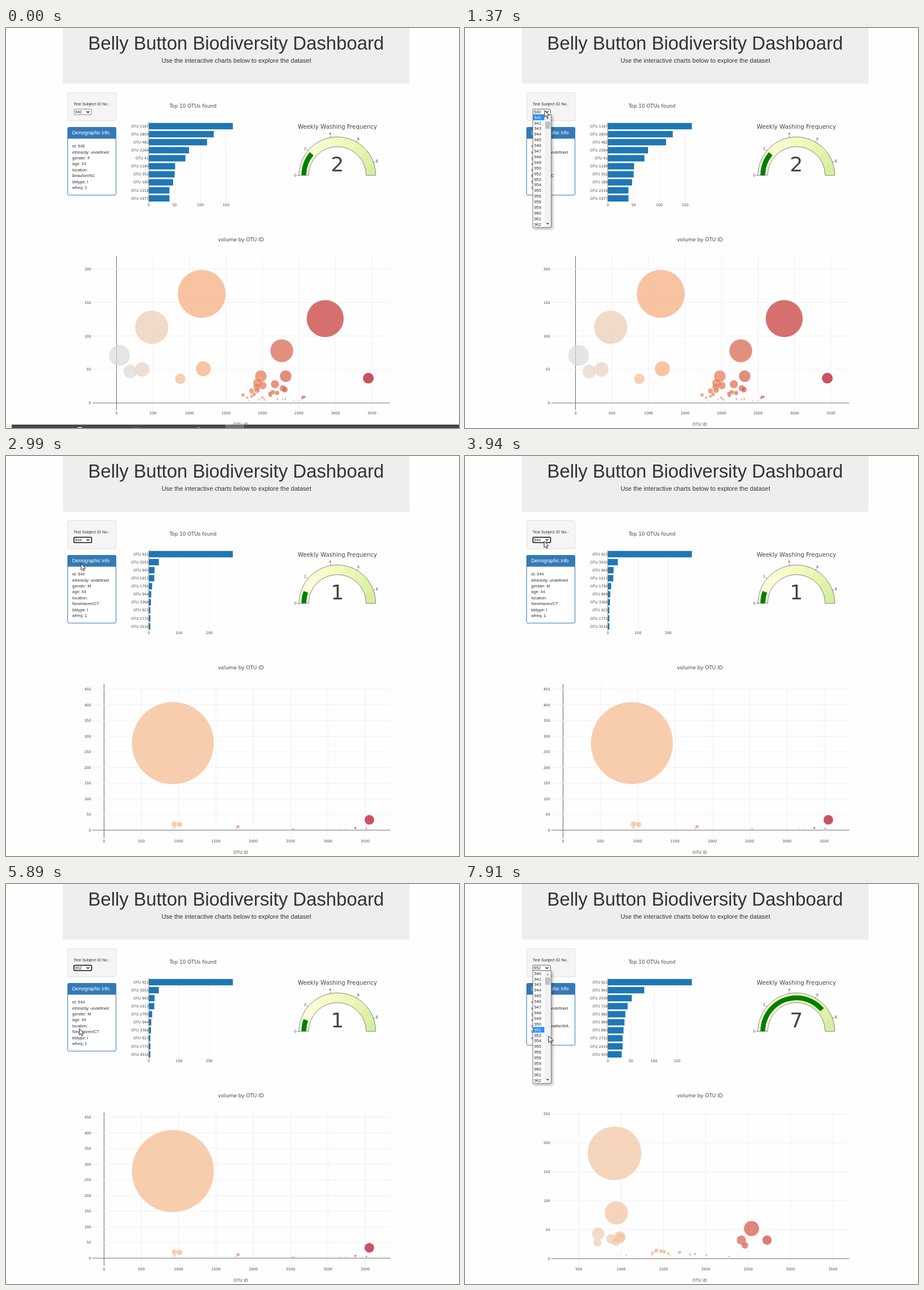
These frames come from a looping animation (797x703 px, 8 s). An HTML page with a canvas:

```html
<!DOCTYPE html>
<html lang="en">
<head>
<meta charset="utf-8">
<title>Belly Button Biodiversity Dashboard</title>
<style>
html, body { margin: 0; width: 100%; height: 100%; overflow: hidden; background: #fefefe; }
canvas { display: block; }
</style>
</head>
<body>
<canvas id="stage" width="797" height="703"></canvas>
<script>
const ctx = document.getElementById('stage').getContext('2d');
const LOOP = 8000;
const SANS = '"Liberation Sans", Arial, sans-serif';
const PLOT = '"DejaVu Sans", Verdana, sans-serif';

// "main" maps OTU ids to counts, largest first; "tail" describes the scatter of small ones.
const subjects = [
  {
    id: 940, freq: 2, x0: 194.5, xStep: 64.2, y0: 659, yStep: 58.85, barTick: 50, minId: 41,
    info: ['gender: F', 'age: 24', 'location:', 'Beaufort/NC', 'bbtype: I', 'wfreq: 2'],
    main: '1167:163 2859:126 482:113 2264:78 41:71 1189:51 352:50 189:47 2318:40 1977:40 3450:37 874:36',
    tail: { size: 36, first: 30, decay: 13, centre: 2110, spread: 1800 }
  },
  {
    id: 944, freq: 1, x0: 172.5, xStep: 65.65, y0: 657.5, yStep: 27.5, barTick: 100, minId: 41,
    info: ['gender: M', 'age: 44', 'location:', 'NewHaven/CT', 'bbtype: I', 'wfreq: 1'],
    main: '922:278 3555:33 943:19 1013:18 1795:11 944:8 3368:7 923:5 1770:5 3516:5',
    tail: { size: 7, first: 4, decay: 9, centre: 2700, spread: 1600 }
  },
  {
    id: 952, freq: 7, x0: 125.8, xStep: 74.5, y0: 658.5, yStep: 50.9, barTick: 50, minId: 350,
    info: ['gender: F', 'age: 48', 'location: Seattle/WA', 'bbtype: I', 'wfreq: 7'],
    main: '922:182 943:79 2539:52 728:43 982:38 989:36 883:34 2722:32 2419:32 939:30 719:28 2461:23',
    tail: { size: 20, first: 14, decay: 11, centre: 1600, spread: 1900 }
  }
];
const MAX_ID = 3450;

function random(seed) {
  return () => (seed = (seed * 16807) % 2147483647) / 2147483647;
}

for (const s of subjects) {
  const next = random(s.id), { size, first, decay, centre, spread } = s.tail;
  s.points = s.main.split(' ').map(pair => pair.split(':').map(Number));
  for (let i = 0; i < size; i++) {
    const reach = spread * (0.2 + i / size);
    s.points.push([centre + (next() - 0.5) * reach, Math.round(first * Math.exp(-i / decay))]);
  }
}

// Subject numbers run from 940 to 962 with three gaps.
const options = Array.from({ length: 23 }, (_, i) => 940 + i).filter(id => ![942, 951, 957].includes(id));
const ROW = 9.895, MENU_TOP = 152;

// Pointer moves: start time, end time, destination
const HOME = [140, 145];
const moves = [
  [280, 730, [154, 162]],
  [730, 1130, HOME],
  [1920, 2290, [138, 171]],
  [2400, 2600, [132, 189]],
  [3230, 4120, HOME],
  [4600, 4820, [149, 205]],
  [4820, 5200, [129, 254]],
  [6050, 6770, HOME],
  [7640, 7910, [147, 267]]
];

function pointerAt(t) {
  let [x, y] = [400, 690];
  for (const [from, to, [tx, ty]] of moves) {
    const k = Math.max(0, Math.min(1, (t - from) / (to - from)));
    const eased = k * k * (3 - 2 * k);
    x += (tx - x) * eased;
    y += (ty - y) * eased;
  }
  return [x, y];
}

function text(str, x, y, size, { align = 'left', color = '#333', font = SANS } = {}) {
  ctx.font = `${size}px ${font}`;
  ctx.textAlign = align;
  ctx.fillStyle = color;
  ctx.fillText(str, x, y);
}
const plotText = (str, x, y, size = 6.24, align = 'center') =>
  text(str, x, y, size, { align, color: '#444', font: PLOT });

function rect(x, y, w, h, fill) {
  ctx.fillStyle = fill;
  ctx.fillRect(x, y, w, h);
}

function paint(fill, stroke, width = 1) {
  if (fill) { ctx.fillStyle = fill; ctx.fill(); }
  if (stroke) { ctx.strokeStyle = stroke; ctx.lineWidth = width; ctx.stroke(); }
}

function box(x, y, w, h, r, fill, stroke, width) {
  ctx.beginPath();
  ctx.roundRect(x, y, w, h, r);
  paint(fill, stroke, width);
}

function line(x1, y1, x2, y2, color, width) {
  ctx.beginPath();
  ctx.moveTo(x1, y1);
  ctx.lineTo(x2, y2);
  paint(null, color, width);
}

function triangle(x, y, size, fill) {
  ctx.beginPath();
  ctx.moveTo(x - 2.5, y);
  ctx.lineTo(x + 2.5, y);
  ctx.lineTo(x, y + size);
  paint(fill);
}

function colorScale(stops, v) {
  const i = Math.max(1, stops.findIndex(([p]) => v <= p));
  const [p, a] = stops[i - 1], [q, b] = stops[i];
  return `rgb(${a.map((c, j) => Math.round(c + (b[j] - c) * (v - p) / (q - p)))})`;
}
const reds = [[0, [220, 220, 220]], [0.2, [245, 195, 157]], [0.4, [245, 160, 105]], [1, [178, 10, 28]]];
const greens = [[0, [255, 255, 229]], [0.5, [244, 250, 190]], [1, [215, 238, 160]]];

function drawHeader() {
  box(100, -6, 610, 104, 3, '#eeeeee');
  text('Belly Button Biodiversity Dashboard', 404.8, 38, 32.74, { align: 'center' });
  text('Use the interactive charts below to explore the dataset', 405.3, 61, 10.94, { align: 'center' });
}

function drawSidebar({ id, info }) {
  box(108.5, 113.5, 85, 49.5, 2, '#f5f5f5', '#e0e0e0');
  text('Test Subject ID No.:', 118.8, 135.7, 7.2);
  const lines = [`id: ${id}`, 'ethinicity: undefined', ...info];
  box(108.5, 174.5, 85, 36 + lines.length * 10.4, 2, '#fff', '#337ab7');
  rect(108, 175, 86, 19.5, '#337ab7');
  text('Demographic Info', 116.6, 186.6, 8.32, { color: '#fff' });
  lines.forEach((s, i) => text(s, 116.6, 210.1 + i * 10.42, 7.3));
}

function drawBars({ points, barTick }) {
  const left = 251.3, unit = 147.8 / points[0][1];
  plotText('Top 10 OTUs found', 329, 139.5, 8.78);
  for (let v = 0; v * unit < 155; v += barTick) {
    const x = left + v * unit;
    line(x, 165.5, x, 306.5, '#f0f0f0');
    plotText(v, x, 313.4);
  }
  points.slice(0, 10).forEach(([id, count], i) => {
    const y = 172.5 + i * 14.1;
    rect(left, y - 5.6, count * unit, 11.2, '#1f77b4');
    plotText(`OTU ${id}`, left, y + 2.2, 6.24, 'right');
  });
  line(left, 165.5, left, 306.5, '#666', 0.7);
}

function ring(outer, inner, from, to, fill, stroke) {
  const angle = v => Math.PI * (1 + v / 9);
  ctx.beginPath();
  ctx.arc(583, 259, outer, angle(from), angle(to));
  ctx.arc(583, 259, inner, angle(to), angle(from), true);
  ctx.closePath();
  paint(fill, stroke, 0.7);
}

function drawGauge({ freq }) {
  plotText('Weekly Washing Frequency', 583, 177.3, 10.24);
  for (let i = 0; i < 9; i++) ring(67.5, 50.6, i, i + 1, colorScale(greens, i / 8));
  ring(63.3, 54.8, 0, freq, '#008000');
  ring(67.5, 50.6, 0, 9, null, '#555');
  for (let v = 0; v < 9; v += 2) {
    const c = -Math.cos(Math.PI * v / 9), s = -Math.sin(Math.PI * v / 9);
    line(583 + 67 * c, 259 + 67 * s, 583 + 70.5 * c, 259 + 70.5 * s, '#444', 0.7);
    plotText(v, 583 + 74 * c, 261.3 + 74 * s);
  }
  plotText(freq, 583, 252, 36);
}

function drawBubbles({ points, x0, xStep, y0, yStep, minId }) {
  const [left, right, top, bottom] = [152, 676, 401, 671.5];
  plotText('volume by OTU ID', 413.3, 374.7, 8.9);
  plotText('OTU ID', 413, 698.5, 7.28);
  for (let i = 0; x0 + i * xStep < right; i++) {
    const x = x0 + i * xStep;
    if (x < left) continue;
    line(x, top, x, bottom, i ? '#f0f0f0' : '#666');
    plotText(i * 500, x, 678.8);
  }
  for (let i = 0; y0 - i * yStep > top; i++) {
    const y = y0 - i * yStep;
    line(left, y, right, y, i ? '#f0f0f0' : '#777');
    plotText(i * 50, 149.8, y + 2.2, 6.24, 'right');
  }
  ctx.globalAlpha = 0.7;
  for (const [id, count] of points) {
    const shade = Math.min(1, (id - minId) / (MAX_ID - minId));
    ctx.beginPath();
    ctx.arc(x0 + id * xStep / 500, y0 - count * yStep / 50, count * 0.26, 0, 7);
    paint(colorScale(reds, shade), '#fff', 0.52);
  }
  ctx.globalAlpha = 1;
}

const icons = {
  block: (x, c) => box(x - 3.5, 116.5, 7, 6, 1, c),
  frame: (x, c) => box(x - 3.5, 116, 7, 7, 0, null, c),
  ring: (x, c) => box(x - 3, 116.5, 6, 6, 3, null, c, 1.5),
  plus: (x, c) => { line(x - 4, 119.5, x + 4, 119.5, c); line(x, 115.5, x, 123.5, c); },
  cross: (x, c) => { line(x - 3, 116, x + 3, 123, c); line(x + 3, 116, x - 3, 123, c); },
  rows: (x, c) => { rect(x - 4, 116, 8, 3, c); rect(x - 4, 120, 8, 3, c); },
  square: x => rect(x - 4.5, 115, 9, 9, '#a6aebd')
};
const toolbar = 'block|ring plus frame ring|block block cross block|plus block rows|square'
  .split('|').map(group => group.split(' '));

function drawToolbar(dx, dy, alpha) {
  if (alpha <= 0) return;
  ctx.save();
  ctx.globalAlpha = Math.min(1, alpha);
  ctx.translate(dx, dy);
  let x = 274;
  toolbar.forEach((group, g) => {
    group.forEach((name, i) => {
      const active = name === 'rows' || (g === 1 && i === 0);
      icons[name](x, active ? '#a2a2a2' : '#dedede');
      x += 12.5;
    });
    x += 4;
  });
  ctx.restore();
}

function drawSelect(value, focused, active) {
  const border = focused ? '#101010' : active ? '#505050' : '#808080';
  box(119.5, 142.7, 31, 9.6, 1.5, '#fff', border, focused ? 1.6 : 0.9);
  text(value, 121.3, 150.1, 7.2, { color: '#222' });
  ctx.beginPath();
  ctx.moveTo(141.8, 146.2);
  ctx.lineTo(144.2, 148.7);
  ctx.lineTo(146.6, 146.2);
  paint(null, '#222', 1.3);
}

function drawMenu(selected, [px, py]) {
  const height = options.length * ROW + 1;
  ctx.save();
  ctx.shadowColor = 'rgba(0,0,0,.35)';
  ctx.shadowBlur = 5;
  ctx.shadowOffsetX = ctx.shadowOffsetY = 2;
  rect(119, MENU_TOP, 33, height, '#fff');
  ctx.restore();
  const overList = px < HOME[0] && py >= MENU_TOP;
  const hovered = overList ? Math.floor((py - MENU_TOP) / ROW) : options.indexOf(selected);
  rect(120, MENU_TOP + 0.3 + hovered * ROW, 19.5, ROW, '#1e90ff');
  options.forEach((id, i) =>
    text(id, 121.8, 159.7 + i * ROW, 7.3, { color: i === hovered ? '#fff' : '#222' }));
  rect(140, 153, 11, height - 2, '#f1f1f1');
  rect(141, 164.5, 9, 12.5, '#c1c1c1');
  triangle(145.5, 160.3, -2.7, '#a0a0a0');
  triangle(145.5, 342.7, 2.7, '#444');
  box(119.5, MENU_TOP + 0.5, 32, height - 1, 0, null, '#767676', 0.9);
}

function drawTaskbar() {
  rect(0, 697, 797, 6, '#f2f2f2');
  rect(10, 697, 787, 6, '#484848');
  rect(386, 697, 33, 6, '#707070');
  rect(126, 701.5, 8, 1.5, '#ddd');
  rect(225, 701.5, 14, 1.5, '#2b7a3c');
  rect(337, 701, 4, 2, '#3a86d0');
}

const arrow = new Path2D('M0 0V11.4L2.6 9L4.3 13L6.1 12.2L4.4 8.4L8 8.2Z');
function drawPointer([x, y]) {
  ctx.save();
  ctx.translate(x, y);
  ctx.fillStyle = '#fff';
  ctx.fill(arrow);
  ctx.strokeStyle = '#111';
  ctx.lineWidth = 0.9;
  ctx.stroke(arrow);
  ctx.restore();
}

function draw(t) {
  const subject = subjects[t < 2950 ? 0 : t < 5970 ? 1 : 2];
  const selected = t < 2810 ? 940 : t < 5810 ? 944 : 952;
  const open = (t >= 1280 && t < 2810) || (t >= 4490 && t < 5810) || t >= 7320;
  const pointer = pointerAt(t);

  rect(0, 0, 797, 703, '#fefefe');
  drawHeader();
  drawSidebar(subject);
  drawBars(subject);
  drawGauge(subject);
  drawBubbles(subject);
  drawToolbar(269.6, 235, Math.min((t - 280) / 150, (640 - t) / 100));
  drawToolbar(0, 0, Math.min((t - 520) / 100, (900 - t) / 150));
  drawSelect(selected, !open && t >= 2810, t >= 1130);
  if (open) drawMenu(selected, pointer);
  if (t >= 280) drawPointer(pointer);
  if (t < 1360) drawTaskbar();
}

const start = performance.now();
function tick() {
  draw((performance.now() - start) % LOOP);
  requestAnimationFrame(tick);
}
tick();
</script>
</body>
</html>
```
